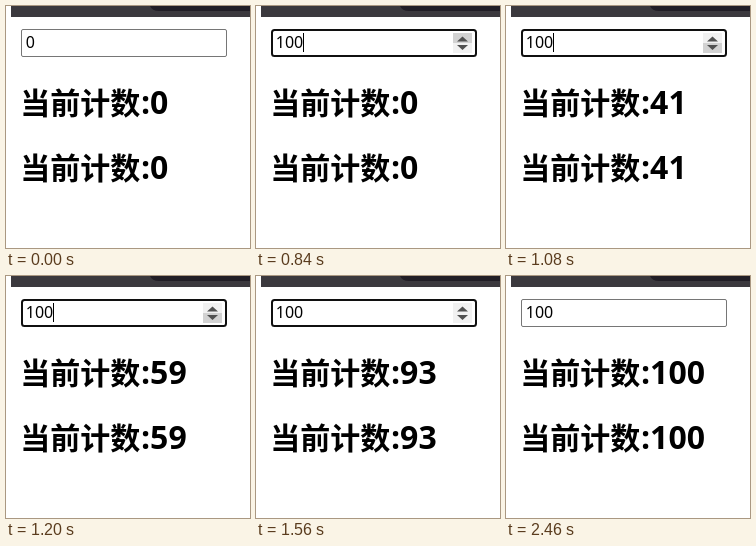
An HTML page that plays this animation: 244x242 px, repeating every 2.55 s.

```html
<!DOCTYPE html>
<html lang="zh">
<head>
<meta charset="utf-8">
<style>
  html, body { margin: 0; width: 100%; height: 100%; overflow: hidden; background: #fff; }
  svg { display: block; }
  .cjk { font: bold 30px "Noto Sans CJK SC", "Noto Sans CJK", sans-serif; }
  .num { font: bold 32px "Noto Sans", sans-serif; }
  #value { font: 16px "Noto Sans", "Open Sans", sans-serif; }
</style>
</head>
<body>
<svg width="244" height="242" viewBox="0 0 244 242">
  <path d="M5 0H244V11H5Z" fill="#3b393e"/>
  <path d="M144 0H244V5H153Q146 5 144 0Z" fill="#211e26"/>
  <rect id="box" fill="#fff"/>
  <text id="value" x="19.8" y="42"></text>
  <path id="caret" d="M47 27h1v19h-1z"/>
  <g id="spin">
    <rect id="up" x="197" y="27" width="19" height="10"/>
    <rect id="down" x="197" y="37" width="19" height="10"/>
    <path d="M201 35.5l5.5-5 5.5 5zM201 39h11l-5.5 5z" fill="#505050"/>
  </g>
  <text class="cjk" x="14.3" y="108">当前计数</text>
  <text class="num" x="135" y="108"></text>
  <text class="cjk" x="14.3" y="173">当前计数</text>
  <text class="num" x="135" y="173"></text>
</svg>
<script>
const LOOP = 2550, STEP = 30;
const $ = id => document.getElementById(id);
const counters = document.querySelectorAll('.num');

function set(el, attrs) {
  for (const k in attrs) el.setAttribute(k, attrs[k]);
}

function drawBox(line, color, radius) {
  set($('box'), {
    x: 15 + line / 2, y: 23 + line / 2, width: 206 - line, height: 28 - line,
    rx: radius, stroke: color, 'stroke-width': line
  });
}

function count(t) {
  const p = Math.min(1, Math.max(0, (t - 856) / 970));
  return Math.ceil(100 * (1 - (1 - p) ** 2));
}

function draw(t) {
  const between = (a, b) => t >= a && t < b;
  const show = (id, on) => set($(id), { visibility: on ? 'visible' : 'hidden' });
  const shade = (id, on) => set($(id), { fill: on ? '#d2d2d2' : '#f1f1f1' });

  if (between(840, 2460)) drawBox(2, '#101010', 2.5);
  else drawBox(1, between(300, 840) ? '#4f4f4f' : '#767676', 1.5);

  $('value').textContent = t < 840 ? '0' : '100';
  show('caret', between(840, 1380) || between(1890, 2400));
  show('spin', between(300, 2460));
  shade('up', between(420, 1080));
  shade('down', between(1080, 1350));
  counters.forEach(el => el.textContent = ':' + count(t));
}

const start = performance.now();
function tick() {
  const t = (performance.now() - start) % LOOP;
  draw(Math.floor(t / STEP) * STEP);
  requestAnimationFrame(tick);
}
tick();
</script>
</body>
</html>
```
